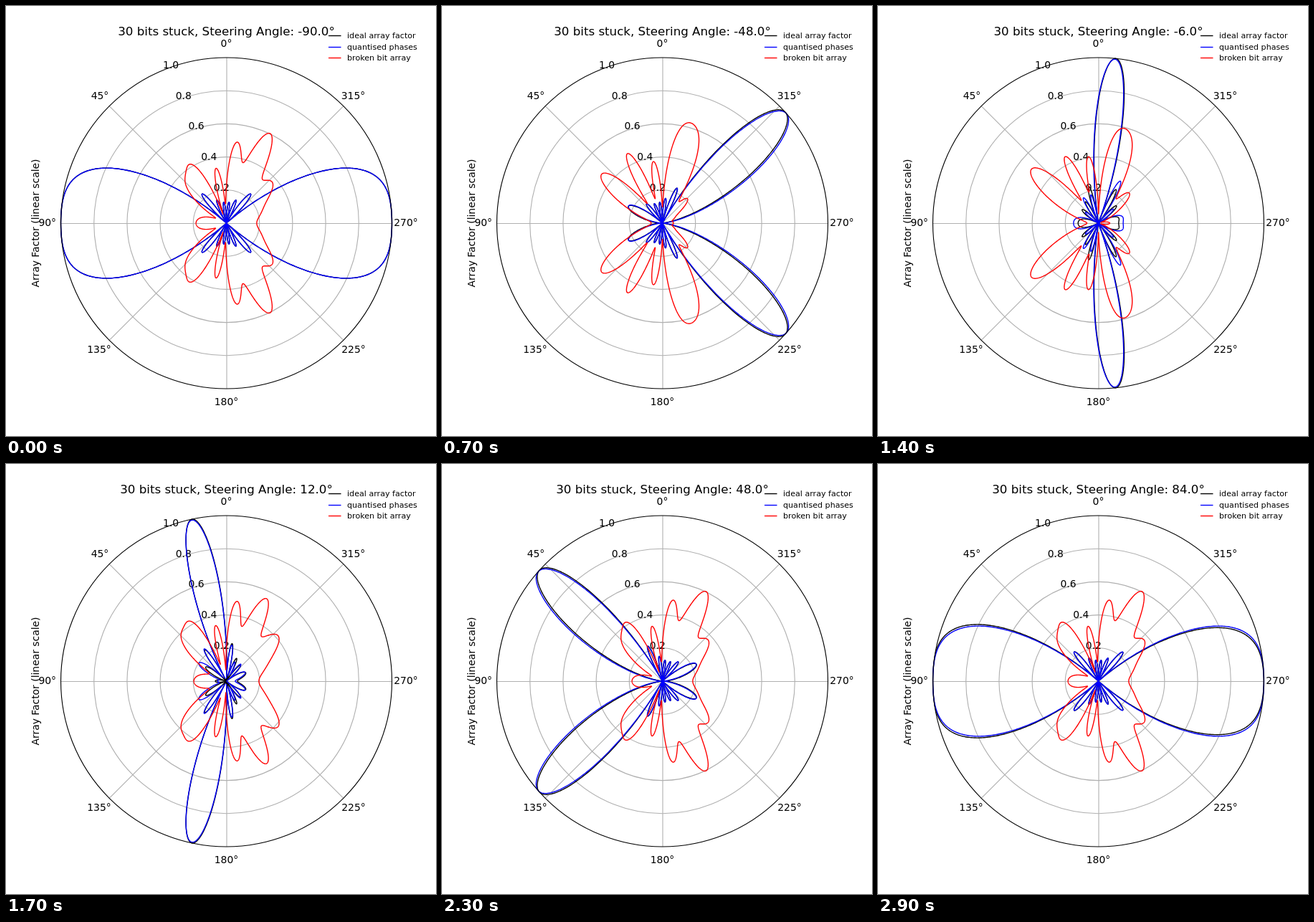
Animation of 600x600 px, one loop 3 s. Source, as an HTML page with a canvas:

```html
<!DOCTYPE html>
<html lang="en">
<head>
<meta charset="utf-8">
<title>Array factor</title>
<style>
  html, body { margin: 0; width: 100%; height: 100%; overflow: hidden; background: #fff; }
  canvas { display: block; }
</style>
</head>
<body>
<canvas id="stage" width="600" height="600"></canvas>
<script>
const ctx = document.getElementById('stage').getContext('2d');
const CX = 307.5, CY = 303, R = 231;
const TAU = 2 * Math.PI, RAD = Math.PI / 180;
const ELEMENTS = 8, LEVELS = 16, SAMPLES = 1440;
const STEP_MS = 100, STEPS = 30;

// Phase codes of the faulty array; only one bit each of elements 1 and 4 still works.
const STUCK = [5, 0, 1, 3, 8, 7, 13, 12];

function phases(steer) {
  const ideal = Array.from({ length: ELEMENTS }, (_, n) => -n * LEVELS / 2 * Math.sin(steer * RAD));
  const quantised = ideal.map(Math.round);
  const broken = STUCK.slice();
  broken[1] += quantised[1] & 8;
  broken[4] += quantised[4] & 1;
  return { ideal, quantised, broken };
}

function arrayFactor(codes, u) {
  let re = 0, im = 0;
  codes.forEach((code, n) => {
    const a = Math.PI * n * u + TAU * code / LEVELS;
    re += Math.cos(a);
    im += Math.sin(a);
  });
  return Math.hypot(re, im) / ELEMENTS;
}

function stroke(color, width) {
  ctx.strokeStyle = color;
  ctx.lineWidth = width;
  ctx.stroke();
}

function line(x1, y1, x2, y2, color, width) {
  ctx.beginPath();
  ctx.moveTo(x1, y1);
  ctx.lineTo(x2, y2);
  stroke(color, width);
}

function circle(r, color) {
  ctx.beginPath();
  ctx.arc(CX, CY, r, 0, TAU);
  stroke(color, 1.11);
}

function text(str, x, y, size = 13.89, align = 'center') {
  ctx.font = `${size}px "DejaVu Sans", sans-serif`;
  ctx.textAlign = align;
  ctx.fillStyle = '#000';
  ctx.fillText(str, x, y);
}

function drawGrid() {
  const grey = '#b0b0b0';
  line(308, CY - R, 308, CY + R, grey, 1.11);
  line(CX - R, 303.5, CX + R, 303.5, grey, 1.11);
  const d = R * Math.SQRT1_2;
  line(CX - d, CY - d, CX + d, CY + d, grey, 1.11);
  line(CX - d, CY + d, CX + d, CY - d, grey, 1.11);

  for (let k = 1; k <= 5; k++) {
    const r = R * k / 5;
    if (k < 5) circle(r, grey);
    text((k / 5).toFixed(1), CX - r * Math.sin(22.5 * RAD),
      Math.round(CY - r * Math.cos(22.5 * RAD) - 2.5), 13.89, 'left');
  }

  const labels = [
    [0, 307.5, 57], [45, 131, 130], [90, 57.7, 307], [135, 130, 484],
    [180, 307.5, 557], [225, 485, 484], [270, 558, 307], [315, 484.5, 130]
  ];
  for (const [angle, x, y] of labels) text(angle + '°', x, y);

  ctx.save();
  ctx.translate(46, CY);
  ctx.rotate(-Math.PI / 2);
  text('Array Factor (linear scale)', 0, 0);
  ctx.restore();
}

function drawPattern(codes, color) {
  ctx.beginPath();
  for (let i = 0; i <= SAMPLES; i++) {
    const theta = TAU * i / SAMPLES;
    const u = Math.sin(theta);
    const r = R * arrayFactor(codes, u);
    ctx.lineTo(CX - r * u, CY - r * Math.cos(theta));
  }
  stroke(color, 1.39);
}

function drawLegend() {
  const rows = [
    ['ideal array factor', '#000', 41.5, 45],
    ['quantised phases', '#00f', 57.5, 61],
    ['broken bit array', '#f00', 72.5, 76]
  ];
  for (const [label, color, lineY, textY] of rows) {
    line(450, lineY, 467.5, lineY, color, 1.39);
    text(label, 476, textY, 11.11, 'left');
  }
}

function draw(now) {
  const steer = -90 + 6 * (Math.floor(now / STEP_MS) % STEPS);
  const { ideal, quantised, broken } = phases(steer);
  ctx.fillStyle = '#fff';
  ctx.fillRect(0, 0, 600, 600);
  ctx.lineJoin = 'round';
  drawGrid();
  drawPattern(ideal, '#000');
  drawPattern(quantised, '#00f');
  drawPattern(broken, '#f00');
  circle(R, '#000');
  text(`30 bits stuck, Steering Angle: ${steer.toFixed(1)}°`, CX, 41, 16.67);
  drawLegend();
}

const start = performance.now();
function tick() {
  draw(performance.now() - start);
  requestAnimationFrame(tick);
}
tick();
</script>
</body>
</html>
```
